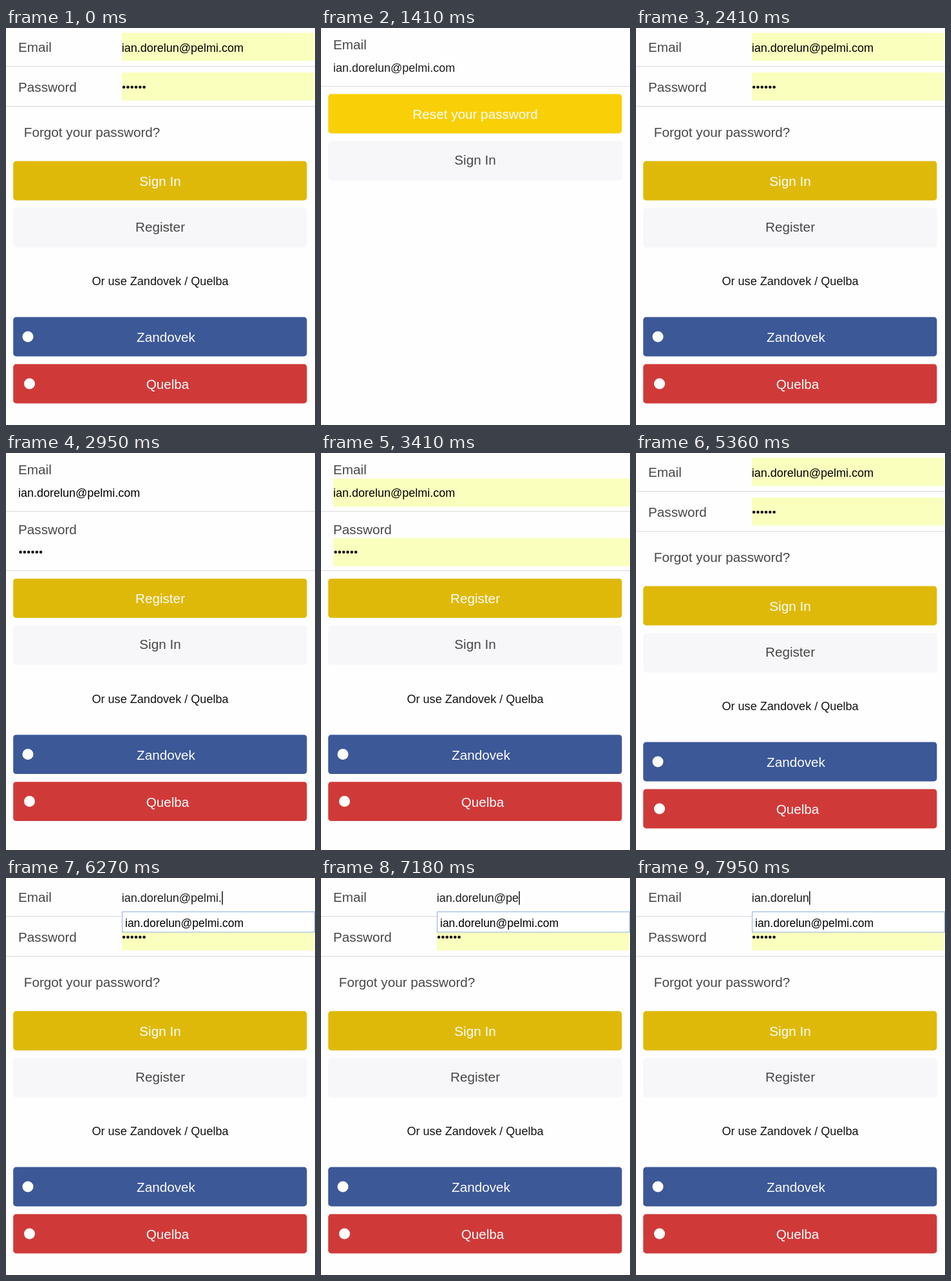
Recreate the animation shown at these times as an HTML page with a canvas. Size 480 by 616 pixels, loop 8000 ms.

```html
<!DOCTYPE html>
<html lang="en">
<head>
<meta charset="utf-8">
<title>Sign in form</title>
<style>
  html, body { margin: 0; width: 100%; height: 100%; overflow: hidden; background: #fefefe; }
  canvas { display: block; width: 480px; height: 616px; }
</style>
</head>
<body>
<canvas id="stage"></canvas>
<script>
const W = 480, H = 616, LOOP = 8000;
const FONT = '"Liberation Sans", Arial, sans-serif';
const EMAIL = 'ian.dorelun@pelmi.com';
const SOCIAL_A = 'Zandovek', SOCIAL_B = 'Quelba';
const LABEL = 20.7, VALUE = 18;
const GREY = '#474747', DARK = '#dfb909', BRIGHT = '#f9d007', PALE = '#f7f6f9';
const FILL = '#faffbd', RULE = '#d9d9e0';

const canvas = document.getElementById('stage');
const ctx = canvas.getContext('2d');
const dpr = window.devicePixelRatio || 1;
canvas.width = W * dpr;
canvas.height = H * dpr;

// Screen changes; autofill tints the fields a moment after each one.
const SCREENS = [
  { at: 0, draw: login, tint: 0 },
  { at: 1200, draw: reset },
  { at: 2000, draw: login, tint: 2160 },
  { at: 2900, draw: register, tint: 3060 },
  { at: 4380, draw: login, tint: 4620 }
];
const FOCUS = 5500, ERASE = 5820, KEY = 200, KEYS = 10;

function rect(x, y, w, h, color) {
  ctx.fillStyle = color;
  ctx.fillRect(x, y, w, h);
}

function text(str, x, y, size, color, align = 'left') {
  ctx.font = `${size}px ${FONT}`;
  ctx.textAlign = align;
  ctx.fillStyle = color;
  ctx.fillText(str, x, y);
}

function circle(x, y, r, color) {
  ctx.fillStyle = color;
  ctx.beginPath();
  ctx.arc(x, y, r, 0, Math.PI * 2);
  ctx.fill();
}

function button(str, y, bg, color = '#fdfdfd', x = 239.5, drop = 38) {
  ctx.fillStyle = bg;
  ctx.beginPath();
  ctx.roundRect(11.2, y - 0.4, 456.2, 60.8, 4.5);
  ctx.fill();
  text(str, x, y + drop, LABEL, color, 'center');
}

function plainButton(str, y) {
  button(str, y, PALE, GREY, 239.5, 35.5);
}

function dots(x, y) {
  for (let i = 0; i < 6; i++) circle(x + 3.1 + i * 6.3, y, 2.3, '#111');
}

function social(y) {
  text(`Or use ${SOCIAL_A} / ${SOCIAL_B}`, 239.5, y, 18.1, '#111', 'center');
  button(SOCIAL_A, y + 50, '#3c5897', '#fdfdfd', 248.5);
  circle(34, y + 80, 8.5, '#fff');
  button(SOCIAL_B, y + 123, '#cf3a39', '#fdfdfd', 251);
  circle(36.5, y + 153, 8.5, '#fff');
}

function login(t, tinted) {
  const erased = t < ERASE ? 0 : Math.min(KEYS, Math.floor((t - ERASE) / KEY) + 1);
  const value = EMAIL.slice(0, EMAIL.length - erased);

  if (tinted) {
    if (!erased) rect(180, 7.5, 298.7, 43.5, FILL);
    rect(180, 69, 298.7, 43.5, FILL);
  }
  rect(0, 59, W, 1, RULE);
  rect(0, 121, W, 1, RULE);
  text('Email', 19, 37, LABEL, GREY);
  text('Password', 19, 98.7, LABEL, GREY);
  text(value, 179.7, 37, VALUE, tinted && !erased ? '#000' : '#1c1c1c');
  if (t >= FOCUS) rect(180 + ctx.measureText(value).width, 20.5, 1.4, 21, '#000');
  dots(180, 91.8);
  if (erased) suggestion();

  text('Forgot your password?', 27.8, 169.3, LABEL, GREY);
  button('Sign In', 207, DARK);
  plainButton('Register', 280);
  social(399);
}

function suggestion() {
  rect(180, 52, 300, 32.5, '#92b0e0');
  rect(181, 53, 298, 30.5, '#fff');
  text(EMAIL, 185, 76, 17.5, '#000');
}

function register(t, tinted) {
  if (tinted) {
    rect(19, 39.7, 461, 43.5, FILL);
    rect(19, 132, 461, 43.5, FILL);
  }
  rect(0, 90, W, 1, RULE);
  rect(0, 182, W, 1, RULE);
  text('Email', 19, 33.3, LABEL, GREY);
  text('Password', 19, 125.7, LABEL, GREY);
  text(EMAIL, 19, 68, VALUE, '#000');
  dots(19.5, 153.8);
  button('Register', 195.4, DARK);
  plainButton('Sign In', 268.2);
  social(387.6);
}

function reset() {
  rect(0, 90, W, 1, RULE);
  text('Email', 19, 33.3, LABEL, GREY);
  text(EMAIL, 19, 68, VALUE, '#1c1c1c');
  button('Reset your password', 103, BRIGHT);
  plainButton('Sign In', 176);
}

function render(t) {
  ctx.setTransform(dpr, 0, 0, dpr, 0, 0);
  rect(0, 0, W, H, '#fefefe');
  const screen = SCREENS.findLast(s => t >= s.at);
  screen.draw(t, t >= screen.tint);
}

const start = performance.now();
function tick() {
  render((performance.now() - start) % LOOP);
  requestAnimationFrame(tick);
}
tick();
</script>
</body>
</html>
```
